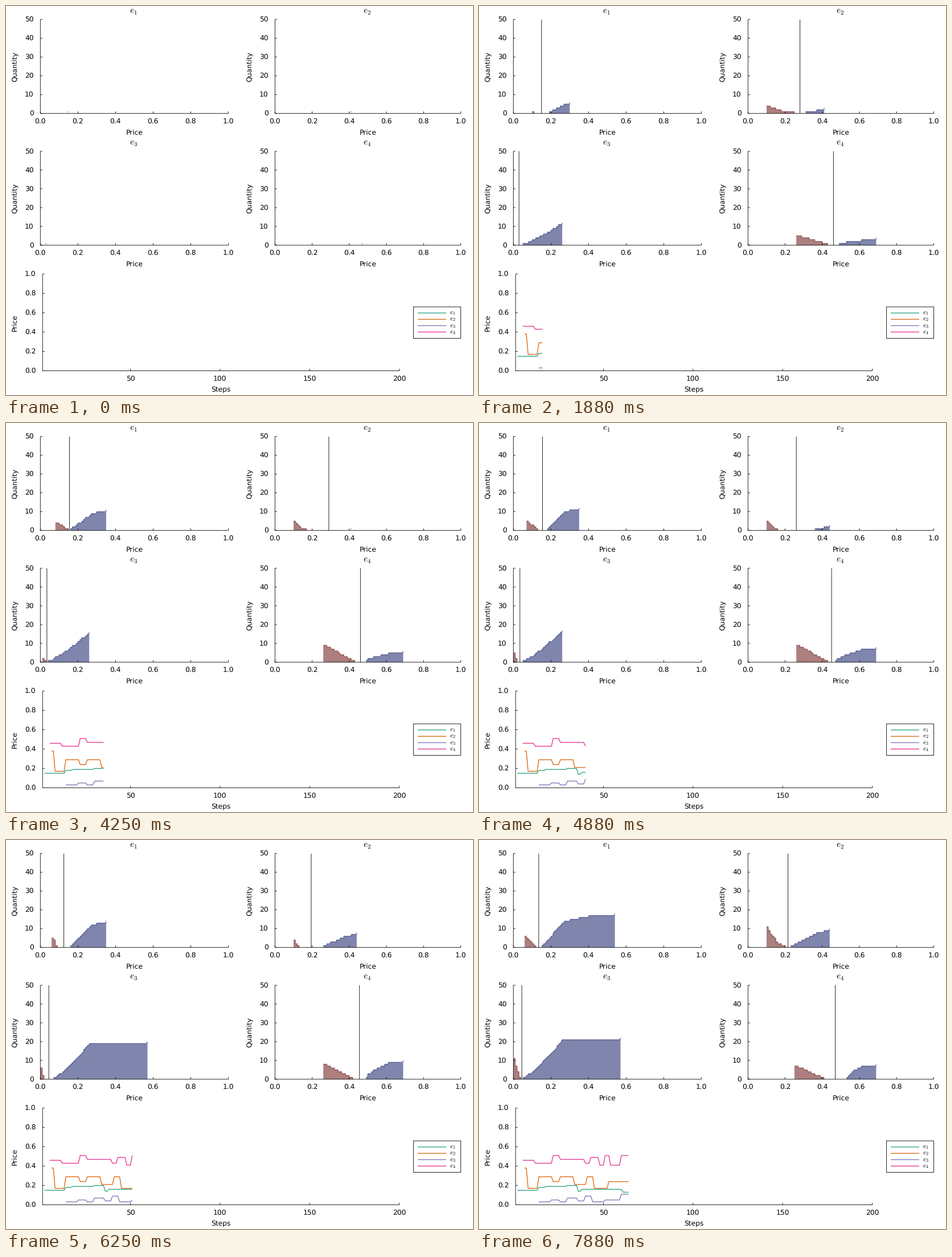
A matplotlib script that plays this animation: 820 by 683 pixels, repeating every 8 s.

```python
import matplotlib.pyplot as plt
import numpy as np
from matplotlib.animation import FuncAnimation

W, H, DPI = 820, 683, 64
PX = 72 / DPI
FRAMES, INTERVAL = 64, 125
THIN, THICK = 0.85 * PX, 1.25 * PX
COLORS = ["#1b9e77", "#d95f02", "#7570b3", "#e7298a"]
BID, ASK = "#5d0000", "#000d5b"

plt.rcParams.update({
    "font.family": "DejaVu Sans",
    "font.size": 12.2 * PX,
    "mathtext.fontset": "cm",
    "text.hinting": "none",
    "lines.solid_capstyle": "butt",
})

# Key points are (frame, value), prices in cents. A side of the book is a ladder
# from the best quote to `far`, bent by `power`; `lone` orders (price: frame) rest beyond it.
MARKETS = [
    dict(mid=[(0, 15), (44, 15.5), (50, 12.5), (63, 13.5)],
         half=[(15, 4), (34, 1), (44, 4.5), (63, 2)],
         bid=dict(count=[(1, 2), (25, 2), (44, 7)], far=[(25, 10), (44, 6)], power=1),
         ask=dict(count=[(0, 2), (63, 14)], far=[(0, 27)], power=1,
                  lone={30: 1, 35: 30, 40: 54, 54: 58}),
         trades=[(2, 15), (14, 18), (18, 19), (30, 20), (36, 14), (38, 16), (61, 13)]),
    dict(mid=[(0, 41), (15, 28), (25, 34.5), (50, 19.5), (63, 21.5)],
         half=[(15, 3), (34, 12), (63, 2)],
         bid=dict(count=[(0, 4), (50, 6), (63, 12)], far=[(0, 10)], power=0.6),
         ask=dict(count=[(15, 2), (22, 0), (38, 0), (50, 6), (63, 8)], far=[(0, 37)],
                  power=1, lone={41: 0, 44: 38}),
         trades=[(6, 38), (8, 17), (14, 29), (22, 24), (26, 29), (34, 21), (41, 29),
                 (45, 17), (53, 24)]),
    dict(mid=[(15, 3), (25, 4.5), (34, 3.5), (44, 3.5), (50, 4.5)],
         half=[(15, 2), (25, 2.5), (34, 0.5), (50, 2.5), (63, 0.5)],
         bid=dict(count=[(15, 1), (34, 3), (44, 8), (63, 14)], far=[(34, 1), (44, 0)],
                  power=0.7),
         ask=dict(count=[(0, 8), (63, 21)], far=[(0, 26)], power=0.8, lone={57: 46}),
         trades=[(14, 3), (21, 5), (26, 3), (30, 7), (36, 4), (40, 9), (44, 3), (51, 5),
                 (60, 11)]),
    dict(mid=[(0, 47), (15, 46), (25, 47), (44, 44.5), (63, 47)],
         half=[(15, 3), (25, 6), (38, 2), (63, 6)],
         bid=dict(count=[(0, 2), (34, 10), (63, 8)], far=[(50, 26), (63, 25)], power=1),
         ask=dict(count=[(15, 3), (25, 1), (44, 9), (63, 7)], far=[(0, 61)], power=1.5,
                  lone={69: 1}),
         trades=[(5, 46), (12, 43), (22, 51), (26, 47), (40, 43), (43, 49), (48, 41),
                 (51, 51), (54, 41), (60, 51)]),
]


def at(points, k):
    return np.interp(k, *zip(*points))


def ladder(side, best, k):
    """Order prices of one side, in cents."""
    n = int(np.ceil(at(side["count"], k)))
    far = at(side["far"], k)
    prices = np.round(best + (far - best) * np.linspace(0, 1, n) ** side["power"])
    lone = [p for p, start in side.get("lone", {}).items() if start <= k]
    return np.r_[prices, lone]


def quotes(market, k):
    """Bids, asks and mid price; the first order alone opens the market."""
    mid = at(market["mid"], k)
    if k == 0:
        return np.array([]), np.array([mid]), None
    mid = np.round(2 * mid) / 2
    half = at(market["half"], k)
    bids = ladder(market["bid"], np.floor(mid - half + 0.5), k)
    asks = ladder(market["ask"], np.ceil(mid + half - 0.5), k)
    return bids, asks[asks > mid], mid


def history(trades):
    """Last price at every step, held between trades."""
    keys, values = np.array(trades).T
    steps = np.arange(keys[0], FRAMES + 1)
    return steps, values[np.searchsorted(keys, steps, side="right") - 1] / 100


fig = plt.figure(figsize=(W / DPI, H / DPI), dpi=DPI, facecolor="white")
stage = fig.add_axes([0, 0, 1, 1], zorder=2)
stage.set(xlim=(0, W), ylim=(H, 0))
stage.axis("off")


def rule(xs, ys, color="black", lw=THIN):
    stage.plot(xs, ys, color=color, lw=lw, snap=False, solid_joinstyle="miter")


def text(x, y, s, **kw):
    stage.text(x, y, s, **{"ha": "center", "va": "baseline", **kw})


def panel(left, right, top, bottom, xlim, ymax, xticks, yticks, xlabel, ylabel, label_x):
    ax = fig.add_axes([left / W, 1 - bottom / H, (right - left) / W, (bottom - top) / H])
    ax.set(xlim=xlim, ylim=(0, ymax))
    ax.axis("off")
    rule([left, left, right], [top, bottom, bottom])
    for v in xticks:
        x = left + (v - xlim[0]) / (xlim[1] - xlim[0]) * (right - left)
        rule([x, x], [bottom, bottom - 3.6])
        text(x, bottom + 18.2, str(v))
    for v in yticks:
        y = bottom - v / ymax * (bottom - top)
        rule([left, left + 3.6], [y, y])
        text(left - 11.6, y + 4.5, str(v), ha="right")
    text((left + right) / 2, bottom + 36.7, xlabel)
    text(label_x, (top + bottom) / 2, ylabel, rotation=90, rotation_mode="anchor")
    return ax


TENTHS = [i / 5 for i in range(6)]


class Depth:
    """Order book of one asset: both cumulative sides and the mid price."""

    def __init__(self, i):
        self.market = MARKETS[i]
        left, right, label_x = [(60.3, 390.4, 18.6), (472.3, 798.5, 430.6)][i % 2]
        top = 23.7 + 231.3 * (i // 2)
        self.ax = panel(left, right, top, top + 165, (0, 1), 50, TENTHS,
                        range(0, 51, 10), "Price", "Quantity", label_x)
        text((left + right) / 2 - 1, top - 11.5, f"$e_{i + 1}$", fontsize=15.5 * PX)
        self.sides = [self.side(BID), self.side(ASK)]
        self.mid, = self.ax.plot([], [], color="black", lw=THIN, snap=False)

    def side(self, color):
        fill, = self.ax.fill([0, 0, 0], [0, 0, 0], color=color, alpha=0.5, lw=0, snap=False)
        line, = self.ax.plot([], [], color=color, alpha=0.5, lw=THICK, snap=False)
        return fill, line

    def update(self, k):
        bids, asks, mid = quotes(self.market, k)
        for book, (fill, line) in zip((bids, asks), self.sides):
            if not len(book):
                line.set_data([], [])
                fill.set_xy([(0, 0)] * 3)
                continue
            lo, hi = book.min(), book.max()
            x = np.linspace(lo, hi, 100)
            below = (book[:, None] <= x + 1e-9).sum(axis=0)
            y = below if book is asks else len(book) - below
            if lo == hi:  # a lone order shows as a dot
                x = x + np.linspace(-0.15, 0.15, 100)
            line.set_data(x / 100, y)
            fill.set_xy(np.column_stack([np.r_[x, hi, lo] / 100, np.r_[y, 0, 0]]))
        self.mid.set_data([] if mid is None else [mid / 100] * 2,
                          [] if mid is None else [0, 50])


def add_legend():
    left, right, top, bottom = 715.5, 798.5, 528.2, 583.5
    rule([left, right, right, left, left], [top, top, bottom, bottom, top])
    for i, color in enumerate(COLORS):
        y = 539 + 11.15 * i
        rule([723, 773], [y, y], color, THICK)
        text(784.5, y + 2.3, f"$e_{i + 1}$", fontsize=11.5 * PX)


depths = [Depth(i) for i in range(4)]
prices = panel(64.2, 690.6, 470.7, 640.5, (1, 200), 1, range(50, 201, 50), TENTHS,
               "Steps", "Price", 18.6)
series = [history(m["trades"]) for m in MARKETS]
lines = [prices.plot([], [], color=c, lw=THICK, snap=False)[0] for c in COLORS]
add_legend()


def update(k):
    for depth in depths:
        depth.update(k)
    for line, (steps, values) in zip(lines, series):
        shown = steps <= k + 1
        line.set_data(steps[shown], values[shown])
    return lines


anim = FuncAnimation(fig, update, frames=FRAMES, interval=INTERVAL, repeat=True,
                     repeat_delay=0, blit=False)
plt.show()
```
